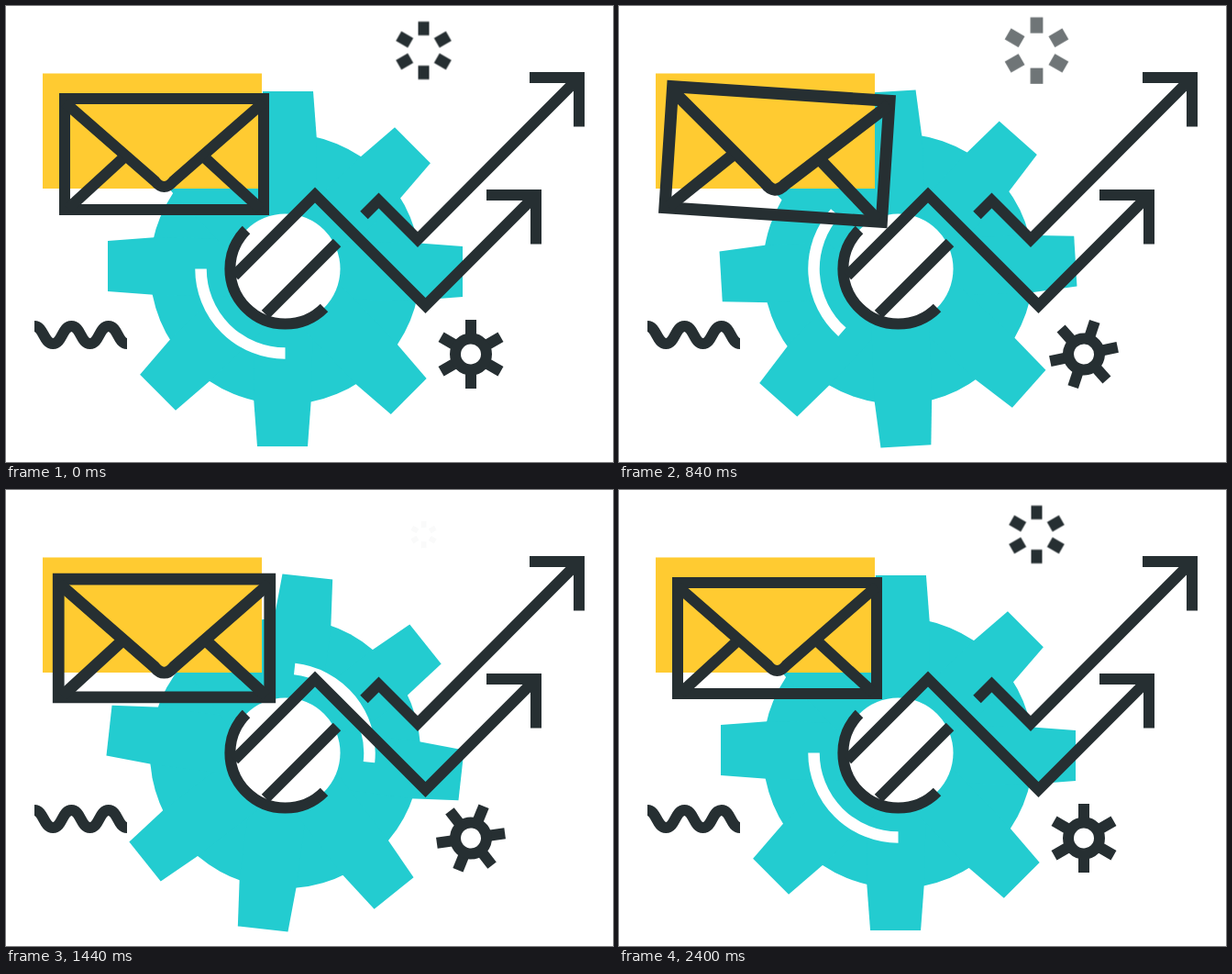
Recreate the animation shown at these times as an HTML page without scripts. Size 662 by 497 pixels, loop 2440 ms.

```html
<!DOCTYPE html>
<html lang="en">
<head>
<meta charset="utf-8">
<title>Mail and growth</title>
<style>
  html, body { margin: 0; width: 100%; height: 100%; overflow: hidden; background: #fff; }
  svg { display: block; width: 662px; height: 497px; }
  .ink { fill: none; stroke: #262f32; stroke-width: 12; }
  .teal { fill: #23ccd0; }
  #gear, #cog, #envelope, #burst { animation: 2440ms infinite; }
  #gear { animation-name: gear; }
  #cog { animation-name: cog; }
  #envelope { animation-name: shake, swell; animation-timing-function: cubic-bezier(.4, 0, .6, 1); }
  #burst { animation-name: burst; animation-timing-function: cubic-bezier(.33, 0, .67, 1); }

  @keyframes gear {
    0% { rotate: 0deg; animation-timing-function: cubic-bezier(.5, 0, .75, .2); }
    19.672% { rotate: 4.5deg; animation-timing-function: cubic-bezier(.333, .114, .667, .61); }
    34.426% { rotate: 41.5deg; animation-timing-function: cubic-bezier(.333, .276, .667, .31); }
    50.82% { rotate: 99.4deg; animation-timing-function: cubic-bezier(.333, .231, .667, .6); }
    59.016% { rotate: 185.8deg; animation-timing-function: cubic-bezier(.333, .36, .667, .86); }
    72.131% { rotate: 342.2deg; animation-timing-function: cubic-bezier(.1, .7, .4, 1); }
    100% { rotate: 360deg; }
  }
  @keyframes cog {
    0% { rotate: 0deg; animation-timing-function: cubic-bezier(.5, 0, .75, .2); }
    19.672% { rotate: -4.5deg; animation-timing-function: cubic-bezier(.333, .114, .667, .48); }
    34.426% { rotate: -41.5deg; animation-timing-function: cubic-bezier(.333, .247, .667, .445); }
    50.82% { rotate: -128.5deg; animation-timing-function: cubic-bezier(.333, .268, .667, .67); }
    59.016% { rotate: -217.5deg; animation-timing-function: cubic-bezier(.333, .377, .667, .83); }
    72.131% { rotate: -342.2deg; animation-timing-function: cubic-bezier(.1, .7, .4, 1); }
    100% { rotate: -360deg; }
  }
  @keyframes shake {
    0%, 21.311% { rotate: 0deg; }
    27.049% { rotate: -6deg; }
    32.787% { rotate: 6deg; }
    38.525% { rotate: -6deg; }
    45.492% { rotate: 6deg; }
    52.459% { rotate: -4.5deg; }
    58.197%, 100% { rotate: 0deg; }
  }
  @keyframes swell {
    0%, 21.311% { scale: 1; }
    37.705%, 50% { scale: 1.1; }
    71.311%, 100% { scale: 1; }
  }
  @keyframes burst {
    0%, 26.23% { scale: 1; opacity: 1; }
    47.54% { scale: 1.45; opacity: 0; }
    47.541%, 57.377% { scale: .45; opacity: 0; }
    74.59%, 100% { scale: 1; opacity: 1; }
  }
</style>
</head>
<body>
<svg viewBox="0 0 662 497">
  <defs>
    <path id="teeth" d="M-24.5-193.5H30.5L34.5-140 28.5 140 24.5 193.5H-30.5L-34.5 140-28.5-140Z"/>
    <path id="spoke" d="M0-37.5V37.5"/>
    <path id="dash" d="M0-31.5V31.5" stroke-dasharray="15 33"/>
  </defs>

  <g transform="translate(304.5 286.5)">
    <g id="gear">
      <g class="teal">
        <circle r="147.5"/>
        <use href="#teeth"/>
        <use href="#teeth" transform="rotate(45)"/>
        <use href="#teeth" transform="rotate(90)"/>
        <use href="#teeth" transform="rotate(135)"/>
      </g>
      <path d="M-92 0A92 92 0 0 0 0 92" fill="none" stroke="#fff" stroke-width="12.5"/>
    </g>
    <circle r="60" fill="#fff"/>
  </g>

  <path fill="#ffcb31" d="M40 73.500H279V199H40Z"/>

  <g class="ink">
    <path d="M262 244A60 60 0 0 0 347 329"/>
    <path d="M283 336L361 258"/>
    <path d="M249 294L337 206 457.500 326.500 578 206M524 206H578V259.500"/>
    <path d="M390.500 228L406.500 212 449 254.500 625 78M571 78H625V131.500"/>
    <path d="M31 349c10 0 10 19 20.200 19s10-19 20.200-19 10 19 20.200 19 10-19 20.200-19 10 19 20.200 19"/>
  </g>

  <g class="ink" transform="translate(172.500 161.500)">
    <g id="envelope">
      <path d="M-108.500-60.500H108.500V60.500H-108.500Z"/>
      <path d="M-108.500-56.500L-10 29.500Q0 41.500 10 29.500L108.500-56.500"/>
      <path d="M-105 59.500L-45 4.500M105 59.500L45 4.500"/>
    </g>
  </g>

  <g class="ink" transform="translate(507 379.500)">
    <g id="cog">
      <use href="#spoke"/>
      <use href="#spoke" transform="rotate(60)"/>
      <use href="#spoke" transform="rotate(120)"/>
      <circle r="17" fill="#fff"/>
    </g>
  </g>

  <g class="ink" transform="translate(455.500 48.500)">
    <g id="burst">
      <use href="#dash"/>
      <use href="#dash" transform="rotate(60)"/>
      <use href="#dash" transform="rotate(120)"/>
    </g>
  </g>
</svg>
</body>
</html>
```
